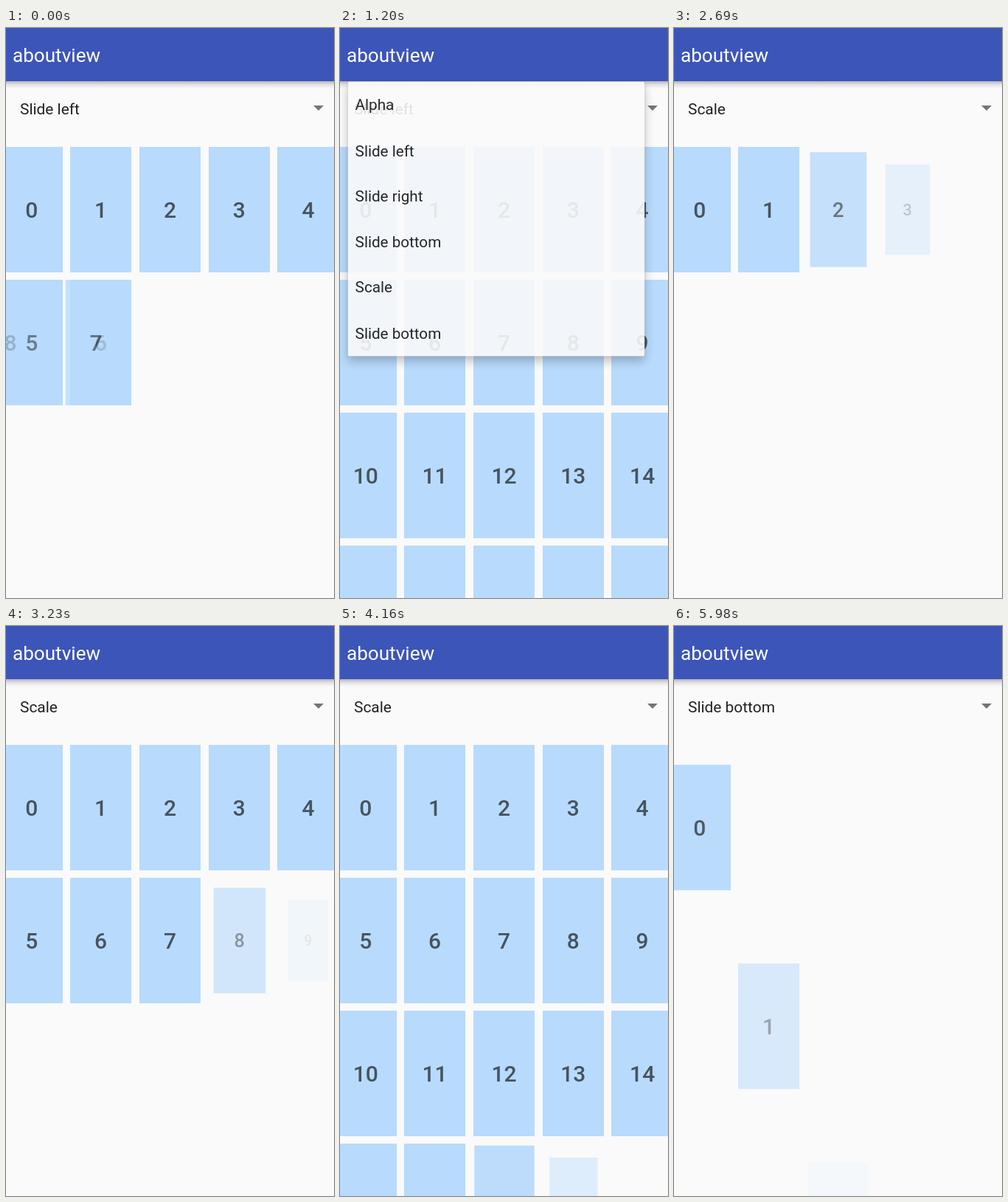
Animation of 445x772 px, one loop 6050 ms. Source, as an HTML page:

```html
<!DOCTYPE html>
<html lang="en">
<head>
<meta charset="utf-8">
<title>aboutview</title>
<style>
  html, body { margin: 0; width: 100%; height: 100%; overflow: hidden; }
  body { position: relative; background: #fafafa; font: 20.9px Roboto, sans-serif; color: #222; }
  header, #label, #arrow, #popup, .card { position: absolute; white-space: nowrap; }
  header { left: 0; top: 0; width: 100%; height: 72px; background: #3c55b9; color: #fff;
    font-size: 26.1px; line-height: 74px; text-indent: 9px; }
  header::after { content: ""; position: absolute; left: 0; right: 0; top: 72px; height: 10px;
    background: linear-gradient(rgba(0,0,0,.28), rgba(0,0,0,.1) 45%, transparent); }
  #label { left: 19px; top: 90px; line-height: 40px; }
  #arrow { left: 416.5px; top: 105px; border: solid transparent; border-width: 7px 7px 0;
    border-top-color: #757575; }
  .card { width: 83.5px; height: 170px; background: #b8dafc; color: #46535f;
    font-size: 30px; font-weight: 500; line-height: 172.5px; text-align: center; }
  #popup { left: 9px; top: 72.5px; width: 406.5px; height: 375.6px; border-radius: 2px;
    background: #fafafa; color: #111; transform-origin: 156px -30px;
    box-shadow: 0 7px 14px rgba(0,0,0,.26), 0 0 3px rgba(0,0,0,.2); }
  #popup div { height: 62.6px; line-height: 64.6px; padding-left: 10px; }
</style>
</head>
<body>
<div id="label"></div>
<div id="arrow"></div>
<header>aboutview</header>
<div id="popup"></div>
<script>
const LOOP = 6050, OPEN_MS = 270, CLOSE_MS = 150, LABEL_LEAD = 150;

const ticks = [0, 120, 240, 360, 510, 660, 810, 930, 1050, 1200, 1320, 2000, 2150, 2450, 2570,
  2690, 2810, 2930, 3080, 3230, 3380, 3500, 3650, 3770, 3890, 4040, 4160, 4310, 4430, 4580,
  4700, 4850, 5380, 5530, 5680, 5830, 5980];

// Card i starts at start + i * gap and eases in over ms; move gives its transform
const scenes = [
  { from: 0, label: "Slide left", start: -815, gap: 94.3, ms: 200,
    move: k => `translateX(${445 * (k - 1)}px)` },
  { from: 2150, label: "Scale", start: 2340, gap: 96.2, ms: 200,
    move: k => `scale(${0.6 + 0.4 * k})` },
  { from: 5680, label: "Slide bottom", start: 5785, gap: 90, ms: 204,
    move: k => `translateY(${610 * (1 - k)}px)` }
];

// Menu openings; row is the entry pressed while closing
const menus = [
  { open: 1020, close: 1948, row: 4 },
  { open: 3350, close: 3740, row: -1 },
  { open: 4550, close: 5480, row: 3 }
];

const $ = id => document.getElementById(id);
const clamp = v => Math.min(1, Math.max(0, v));
const sceneAt = t => scenes.findLast(s => s.from <= t);

function add(parent, text, className = "") {
  const el = document.createElement("div");
  el.textContent = text;
  el.className = className;
  return parent.appendChild(el);
}

const label = $("label"), popup = $("popup");
const rows = ["Alpha", "Slide left", "Slide right", "Slide bottom", "Scale", "Slide bottom"]
  .map(name => add(popup, name));
const grid = document.createElement("div");
document.body.insertBefore(grid, label);
const cards = Array.from({ length: 20 }, (_, i) => {
  const card = add(grid, i, "card");
  card.style.left = -7 + 93.85 * (i % 5) + "px";
  card.style.top = 161 + 180 * Math.floor(i / 5) + "px";
  return card;
});

function drawMenu(t) {
  const menu = menus.find(m => t >= m.open && t < m.close + CLOSE_MS);
  popup.style.visibility = menu ? "visible" : "hidden";
  if (!menu) return;
  const closing = t > menu.close;
  const k = closing ? 1 - clamp((t - menu.close) / CLOSE_MS)
    : 1 - (1 - clamp((t - menu.open) / OPEN_MS)) ** 2;
  popup.style.opacity = k;
  popup.style.transform = k < 1 ? `scale(${0.9 + 0.1 * k})` : "none";
  rows.forEach((row, i) =>
    row.style.background = closing && i === menu.row ? "rgba(0,0,0,.025)" : "none");
}

function draw(t) {
  const scene = sceneAt(t);
  label.textContent = sceneAt(t + LABEL_LEAD).label;
  cards.forEach((card, i) => {
    const k = clamp((t - scene.start - i * scene.gap) / scene.ms);
    card.style.opacity = k;
    card.style.transform = k < 1 ? scene.move(k) : "none";
  });
  drawMenu(t);
}

const begin = performance.now();
function frame() {
  const t = (performance.now() - begin) % LOOP;
  draw(ticks.findLast(tick => tick <= t));
  requestAnimationFrame(frame);
}
frame();
</script>
</body>
</html>
```
